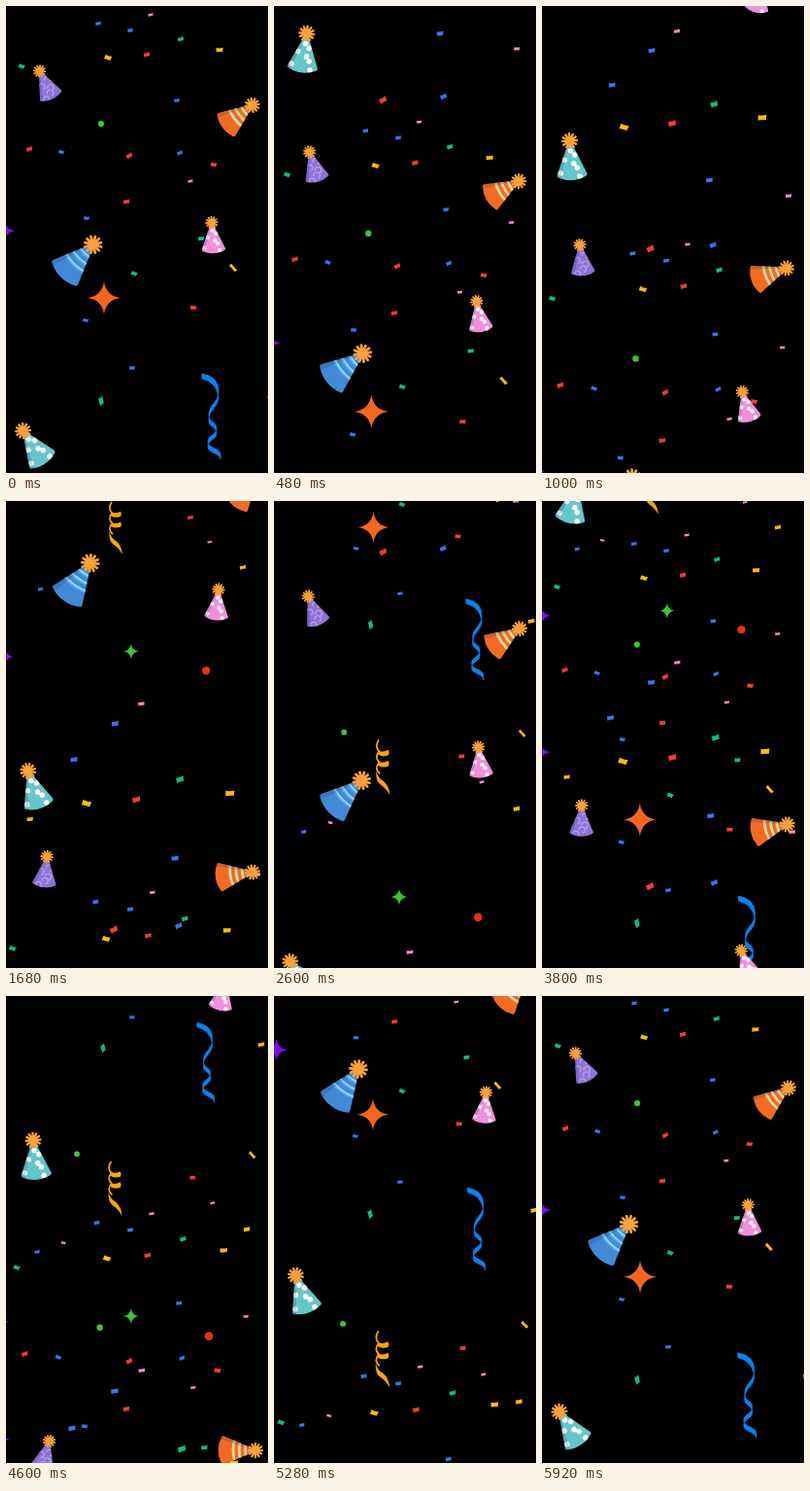
An HTML page that plays this animation: 270x480 px, repeating every 5.96 s.

```html
<!DOCTYPE html>
<html lang="en">
<head>
<meta charset="utf-8">
<title>Party confetti</title>
<style>
html, body { margin: 0; width: 100%; height: 100%; overflow: hidden; background: #000; }
svg { display: block; width: 100%; height: 100%; }
</style>
</head>
<body>
<svg id="stage" viewBox="0 0 270 480">
  <defs id="defs">
    <clipPath id="cone"><path d="M-5-44L-42 44Q-43 48-39 50Q0 70 39 50Q43 48 42 44L5-44Z"/></clipPath>
  </defs>
</svg>
<script>
const NS = 'http://www.w3.org/2000/svg';
const LOOP = 5960, STEP = 40, FILM_RATE = 0.03;
const stage = document.getElementById('stage');
const defs = document.getElementById('defs');

function add(parent, tag, attrs) {
  const node = document.createElementNS(NS, tag);
  for (const key in attrs) node.setAttribute(key, attrs[key]);
  return parent.appendChild(node);
}

const paper = {
  blue: { fill: '#3b73f0', w: 5.5, h: 4 },
  red: { fill: '#f23c36', w: 6.2, h: 4.6 },
  yellow: { fill: '#fdb813', w: 7, h: 4.8 },
  green: { fill: '#0cc07a', w: 6, h: 4.5 },
  pink: { fill: '#f788d0', w: 5, h: 3 }
};

// Every scrap is the same little flag; its tilt follows from its place
function scrap(parent, colour, x, y, w = paper[colour].w, h = paper[colour].h, turn = (x * 7 + y * 3) % 50 - 20) {
  add(parent, 'path', {
    d: 'M-.5-.35Q0-.3 .5-.55L.48.35Q0 .35-.45.55Z', fill: paper[colour].fill,
    transform: `translate(${x} ${y}) rotate(${turn}) scale(${w} ${h})`
  });
}
function scatter(parent, places) {
  for (const colour in places) {
    for (const [x, y] of places[colour]) scrap(parent, colour, x, y);
  }
}
function star(parent, fill, x, y, r) {
  add(parent, 'path', {
    d: 'M0-1Q.12-.12 1 0Q.12.12 0 1Q-.12.12-1 0Q-.12-.12 0-1', fill,
    transform: `translate(${x} ${y}) scale(${r})`
  });
}
function ball(parent, fill, cx, cy, r) {
  add(parent, 'circle', { cx, cy, r, fill });
}

// A flat band winding between turning points, thin where it runs vertically
function ribbon(parent, turns, height, fill) {
  const trace = points => points.slice(1).map(([x, y], i) => {
    const [px, py] = points[i], mid = (py + y) / 2;
    return `C${px} ${mid} ${x} ${mid} ${x} ${y}`;
  }).join('');
  const back = turns.map(([x, y]) => [x, y + height]).reverse();
  const [top, bend] = turns, low = back[back.length - 1];
  add(parent, 'path', {
    d: `M${top}Q${bend[0]} ${top[1] + 3} ${bend}${trace(turns.slice(1))}L${back[0]}`
      + `${trace(back.slice(0, -1))}Q${bend[0] - 3} ${low[1] + 3} ${low}Z`,
    fill, stroke: fill, 'stroke-width': 0.8, 'stroke-linejoin': 'round'
  });
}

function spring(parent, stroke) {
  const curl = y => `M108 ${y - 2}Q101 ${y + 5} 108 ${y + 11}`;
  const fold = y => `M106 ${y - 2}Q112 ${y} 117 ${y - 3}Q119 ${y} 117 ${y + 3}Q110 ${y + 5} 106 ${y + 2}Z`;
  add(parent, 'path', { d: 'M107 531Q102 538 107 544' + curl(545) + curl(557), fill: 'none', stroke, 'stroke-width': 1.8 });
  add(parent, 'path', { d: fold(545) + fold(557) + 'M104 565Q106 573 112 576Q118 581 119 591Q114 583 109 580Q103 576 104 565Z', fill: stroke });
}

// The shower: one cluster appears again below, larger
const sheet = add(defs, 'g', { id: 'sheet' });
const SPREAD = 1.43;
function repeated(id, places, shiftY) {
  scatter(add(defs, 'g', { id }), places);
  add(sheet, 'use', { href: '#' + id });
  add(sheet, 'use', { href: '#' + id, transform: `translate(-72.4 ${shiftY}) scale(${SPREAD})` });
}
repeated('pair', { pink: [[149, 9]], blue: [[128, 25]] }, 749);
repeated('cluster', {
  blue: [[95, 18], [176, 97], [179, 151]],
  red: [[145, 50], [127, 154]],
  yellow: [[105, 53], [220, 45]],
  green: [[180, 34]],
  pink: [[242, 110]]
}, 800);
scatter(sheet, {
  blue: [[57, 150], [83, 218], [82, 323], [130, 372], [25, 631]],
  red: [[24, 147], [214, 163], [124, 201], [193, 310], [197, 549]],
  yellow: [[273, 402], [257, 606], [13, 894]],
  green: [[16, 62], [201, 239], [132, 275]],
  pink: [[190, 180], [219, 577], [54, 621]]
});
scrap(sheet, 'green', 98, 406, 4.5, 9, -14);
for (const [x, y] of [[234, 269], [263, 524]]) scrap(sheet, 'yellow', x, y, 9, 3.5, 52);

ball(sheet, '#3fc436', 98, 121, 3.1);
ball(sheet, '#3fc436', 69, 523, 3.1);
ball(sheet, '#e63016', 215, 724, 4.6);
star(sheet, '#7a10e8', -2, 231, 11.5);
star(sheet, '#7a10e8', -17, 708, 11.5);
star(sheet, '#f4651f', 101, 300, 17);
star(sheet, '#3fc436', 129, 702, 8.7);
ribbon(sheet, [[202, 378], [219, 396], [209, 421], [217, 434], [208, 448], [221, 461]], 5, '#0b82f0');
spring(sheet, '#fda50f');

// Hat patterns, in a box 100 units tall
function stripe(parent, y, stroke, width) {
  add(parent, 'path', { d: `M-45 ${y - 4}Q0 ${y + 14} 45 ${y - 4}`, fill: 'none', stroke, 'stroke-width': width });
}
function stripes(parent, edge, light) {
  for (let y = 12; y > -30; y -= 18) {
    stripe(parent, y, edge, 6);
    stripe(parent, y - 3, light, 4);
  }
}
function dots(parent) {
  for (let i = 0; i < 7; i++) {
    const y = 12 * i - 22;
    ball(parent, '#fff', 0.36 * (y + 50) * Math.sin(2.2 * i), y, 7.5);
  }
}
function rings(parent) {
  for (let i = 0; i < 5; i++) {
    const y = 16 * i - 12, x = 0.35 * (y + 50) * Math.cos(2.6 * i);
    add(parent, 'path', { d: `M${x - 11} ${y}a11 11 0 1 1 13 11`, fill: 'none', stroke: '#b9a2f2', 'stroke-width': 4 });
  }
}

// Centre in px and angle in degrees from upright, t in seconds
const hats = [
  { size: 29, body: '#8f74d6', decorate: rings,
    x: () => 40.7, y: t => 80 + 180 * t, angle: t => -25 + 18.5 * t },
  { size: 35, body: '#f26b25', decorate: g => stripes(g, '#ffc25c', '#a5eee4'),
    x: t => 235.5 + 3.5 * (t - 1.1) ** 2, y: t => 112.5 + 163 * t, angle: t => 53 + 17 * t },
  { size: 29, body: '#f28fdb', decorate: dots,
    x: t => 213 - 4.8 * t + 2 * t * t, y: t => 237 + 173.5 * t, angle: t => -4 - 11.5 * t },
  { size: 37, body: '#66c5cb', decorate: dots,
    x: t => 28 + 0.9 * t * t, y: t => 452 + 207 * t, angle: t => -34 - 21 * t },
  { size: 43, body: '#4389d6', decorate: g => stripes(g, '#5fa5e8', '#86e2f7'),
    x: () => 74.5, y: t => 260.5 + 236 * t, angle: t => 45 + 13.5 * t }
];

hats.forEach((hat, index) => {
  const group = add(defs, 'g', { id: 'hat' + index });
  const cone = add(group, 'g', { 'clip-path': 'url(#cone)' });
  add(cone, 'rect', { x: -50, y: -50, width: 100, height: 120, fill: hat.body });
  hat.decorate(cone);
  add(cone, 'path', { d: 'M-5-50L-50 46L-38 70Q-20 10 0-50Z', fill: '#203060', opacity: 0.2 });
  for (let turn = 0; turn < 360; turn += 30) {
    add(group, 'path', {
      d: 'M0 0V-20', stroke: '#faa03c', 'stroke-width': 6.5, 'stroke-linecap': 'round',
      transform: `translate(0 -50) rotate(${turn})`
    });
  }
  ball(group, '#faa03c', 0, -50, 13);
});

const sheetCopies = [0, 3690, 5978].map(start => ({ start, node: add(stage, 'use', { href: '#sheet' }) }));
const hatCopies = [0, 2425, 5978].flatMap(start =>
  hats.map((hat, i) => ({ start, hat, node: add(stage, 'use', { href: '#hat' + i }) })));

function draw(time) {
  for (const { start, node } of sheetCopies) {
    const t = (time - start) / 1000, scale = 1 + 0.05 * t;
    node.setAttribute('transform', `translate(${128 * (1 - scale)} ${235.5 * t}) scale(${scale})`);
  }
  for (const { start, hat, node } of hatCopies) {
    const t = (time - start) / 1000;
    node.setAttribute('transform',
      `translate(${hat.x(t)} ${hat.y(t)}) rotate(${hat.angle(t)}) scale(${hat.size / 100})`);
  }
}

// Motion runs at 30 pictures a second, shown in 40 ms steps
const began = performance.now();
function tick() {
  const shown = Math.floor((performance.now() - began) % LOOP / STEP) * STEP;
  draw(Math.round(shown * FILM_RATE) / FILM_RATE);
  requestAnimationFrame(tick);
}
draw(0);
requestAnimationFrame(tick);
</script>
</body>
</html>
```
